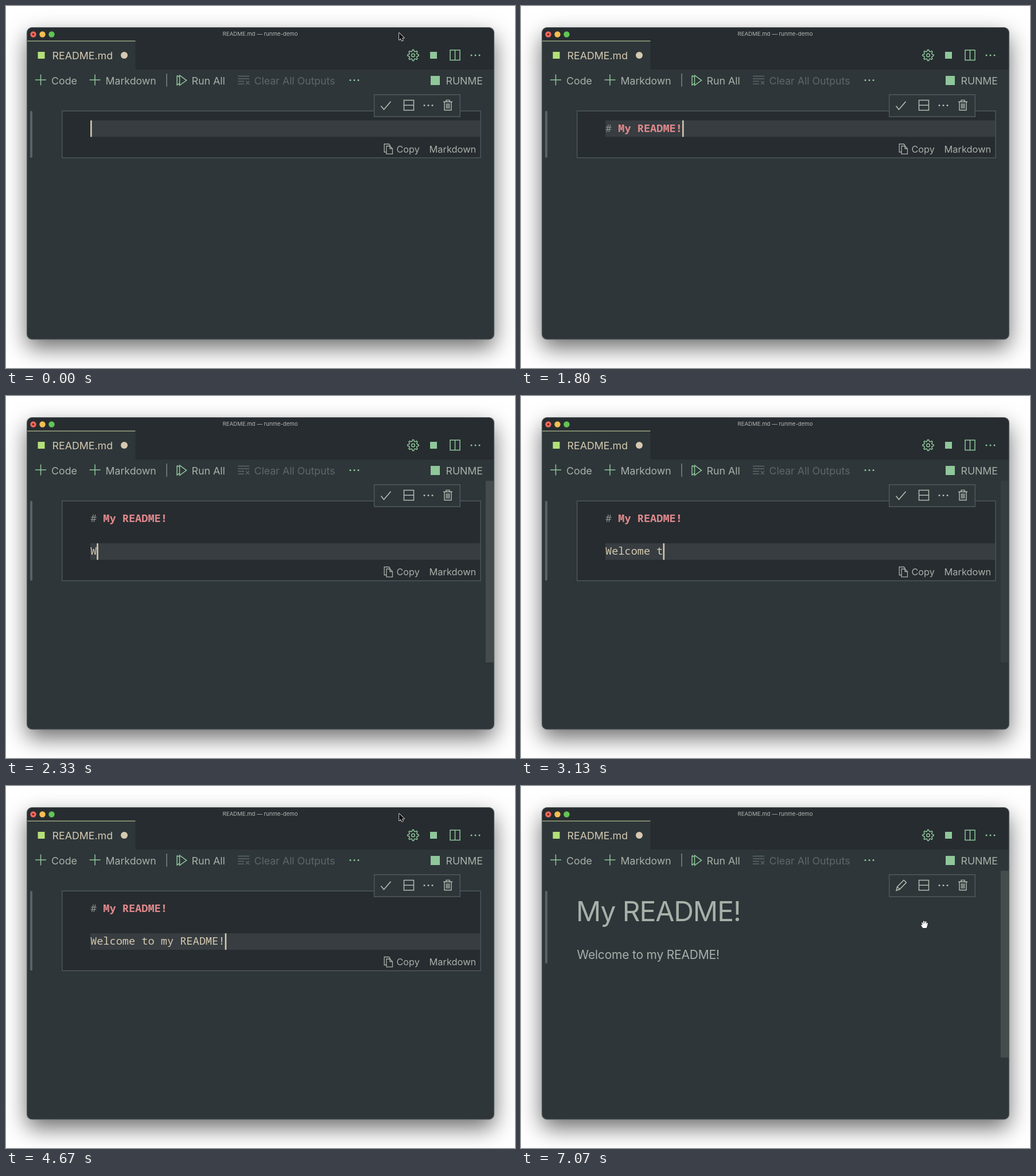
Recreate the animation shown at these times as an HTML page with a canvas. Size 887 by 632 pixels, loop 7.2 s.

```html
<!DOCTYPE html>
<html lang="en">
<head>
<meta charset="utf-8">
<title>README.md — runme-demo</title>
<style>
html, body { margin: 0; width: 100%; height: 100%; overflow: hidden; background: #fff; }
canvas { display: block; width: 887px; height: 632px; }
</style>
</head>
<body>
<canvas id="stage"></canvas>
<script>
const W = 887, H = 632, LOOP = 7200;
const SANS = 'Inter, "Open Sans", sans-serif';
const MONO = '"Noto Sans Mono", "DejaVu Sans Mono", monospace';
const C = {
  body: '#2e3639', dark: '#272c30', line: '#373d41', border: '#4f595d', bar: '#596266',
  text: '#a8b0a9', dim: '#5d6768', cream: '#d5c9b0', mint: '#8fc79a', lime: '#b4e078',
  pink: '#df898c', hash: '#8b928f', icon: '#b4bbb3'
};
const PITCH = 11.17, LINE_H = 28.75, TOP = 199.7, LEFT = 147;
const RENDER = 5600, PENCIL = 5670;

const SCRIPT = '# My README!\n\nWelcome to my README!';
const KEYS = [
  330, 530, 800, 1000, 1070, 1130, 1270, 1330, 1400, 1530, 1600, 1800, 2000, 2130,
  2330, 2530, 2600, 2670, 2800, 2870, 2930, 3070, 3130, 3200,
  3270, 3400, 3470, 3600, 3730, 3800, 3930, 4000, 4130, 4200, 4400
];

const dpr = window.devicePixelRatio || 1;
function prepare(canvas) {
  canvas.width = W * dpr;
  canvas.height = H * dpr;
  const c = canvas.getContext('2d');
  c.scale(dpr, dpr);
  return c;
}
const view = prepare(document.getElementById('stage'));
const base = document.createElement('canvas');
let g = prepare(base);

const clamp = (v, a = 0, b = 1) => Math.min(b, Math.max(a, v));
const ramp = (t, a, b) => clamp((t - a) / (b - a));
const ease = p => p * p * (3 - 2 * p);

function rect(x, y, w, h, color) {
  g.fillStyle = color;
  g.fillRect(x, y, w, h);
}
function round(x, y, w, h, r, fill, stroke, width = 1) {
  g.beginPath();
  g.roundRect(x, y, w, h, r);
  if (fill) { g.fillStyle = fill; g.fill(); }
  if (stroke) { g.strokeStyle = stroke; g.lineWidth = width; g.stroke(); }
}
function disc(x, y, r, color) {
  g.beginPath();
  g.arc(x, y, r, 0, 7);
  g.fillStyle = color;
  g.fill();
}
function stroke(d, color, width = 1.5) {
  g.strokeStyle = color;
  g.lineWidth = width;
  g.stroke(new Path2D(d));
}
function text(s, x, y, size, color, { font = SANS, weight = 400, gap = 0, align = 'left' } = {}) {
  g.font = `${weight} ${size}px ${font}`;
  g.letterSpacing = gap + 'px';
  g.textAlign = align;
  g.fillStyle = color;
  g.fillText(s, x, y);
}
function dots(x, y, color) {
  for (const dx of [-7, 0, 7]) disc(x + dx, y, 1.5, color);
}
function gear(x, y) {
  g.beginPath();
  for (let i = 0; i < 32; i++) {
    const r = i % 4 < 2 ? 9.6 : 7, a = (i - 0.5) * Math.PI / 16;
    g.lineTo(x + r * Math.cos(a), y + r * Math.sin(a));
  }
  g.closePath();
  g.moveTo(x + 2.8, y);
  g.arc(x, y, 2.8, 0, 7);
  g.strokeStyle = C.mint;
  g.lineWidth = 1.5;
  g.stroke();
}

function drawWindow() {
  rect(0, 0, W, H, '#fff');
  g.save();
  g.shadowColor = 'rgba(0,0,0,.58)';
  g.shadowBlur = 38 * dpr;
  g.shadowOffsetY = 15 * dpr;
  round(36.5, 37.5, 814, 544.5, 9, C.body);
  g.restore();

  g.save();
  g.beginPath();
  g.roundRect(36.5, 37.5, 814, 544.5, 9);
  g.clip();
  rect(36, 37, 815, 74, C.dark);
  rect(36, 61, 189.5, 50, C.body);
  rect(36, 60.5, 189.5, 1.3, '#a9b68d');
  g.restore();
  round(36.5, 37.5, 814, 544.5, 9, null, '#5c6366', 1.2);

  disc(47.5, 49.5, 5.2, '#ec6a5e');
  disc(47.5, 49.5, 1.8, '#7f1d14');
  disc(63.5, 49.5, 5.2, '#f4be50');
  disc(79.5, 49.5, 5.2, '#61c455');
  text('README.md — runme-demo', 443, 52, 9.6, '#b3b6b5', { align: 'center' });

  rect(55.5, 80, 12, 12, C.lime);
  text('README.md', 80.5, 92.5, 17.8, C.cream);
  disc(206, 86, 6, C.cream);

  gear(709.5, 86);
  rect(739, 80, 12, 12, C.mint);
  stroke('M774 77h17v17.5h-17zM782.5 77v17.5', C.mint);
  dots(818, 86, C.mint);

  stroke('M51 129h19M60.5 119.5v19M145.5 129h19M155 119.5v19', C.mint);
  text('Code', 79, 136.5, 17.8, C.text);
  text('Markdown', 173.5, 136.5, 17.7, C.text);
  rect(279.3, 118, 1.5, 23, '#7c8683');
  stroke('M298 121.5v16.5l4-2.5M298 121.5l4 2.2M302.5 121v17.5l12-8.7z', C.mint);
  text('Run All', 323.5, 136.5, 17.8, C.text);
  stroke('M404 122.5h20M404 127h20M404 131.5h11M404 136h11M418 131l6 6M424 131l-6 6', C.dim, 1.3);
  text('Clear All Outputs', 432.5, 136.5, 17.7, C.dim);
  dots(607, 129.5, C.mint);
  rect(740, 122, 16, 16, C.mint);
  text('RUNME', 766.5, 136.5, 17.7, C.text);
}

function drawScrollbar(t) {
  let alpha, end;
  if (t >= RENDER) {
    alpha = 1;
    end = 474;
  } else {
    alpha = ramp(t, 1985, 2100) * (1 - ramp(t, 2630, 3430));
    end = t < 2130 ? 484 : 465;
  }
  g.globalAlpha = alpha;
  rect(835.8, 148, 14, end - 148, '#454c4e');
  g.globalAlpha = 1;
}

function drawEditor(t) {
  const count = KEYS.filter(k => k <= t).length;
  const lines = SCRIPT.slice(0, count).split('\n');
  const row = lines.length - 1;
  const bottom = 265 + row * LINE_H;
  const y = TOP + row * LINE_H;

  round(42, 183, 4, bottom - 183, 2, C.bar);
  rect(97.8, 183.3, 729.2, bottom - 183.3, C.dark);
  g.strokeStyle = C.border;
  g.lineWidth = 1.4;
  g.strokeRect(97.8, 183.3, 729.2, bottom - 183.3);
  rect(LEFT, y, 679, LINE_H, C.line);

  const mono = { font: MONO };
  const baseline = n => TOP + n * LINE_H + 20;
  text(lines[0].slice(0, 1), LEFT, baseline(0), 18.6, C.hash, mono);
  text(lines[0].slice(2), LEFT + 2 * PITCH, baseline(0), 18.6, C.pink, { font: MONO, weight: 700 });
  if (row === 2) text(lines[2], LEFT, baseline(2), 18.6, C.cream, mono);
  rect(LEFT + lines[row].length * PITCH, y, 2.6, LINE_H, C.cream);

  g.save();
  g.translate(658, bottom - 25);
  stroke('M5 4.5h6l4.5 4.5v9.3h-10.5zM11 4.5v4.5h4.5M5 15h-3.8v-14h8l2.5 3', C.text, 1.3);
  g.restore();
  text('Copy', 680.5, bottom - 9.5, 16.2, C.text);
  text('Markdown', 737.5, bottom - 9.5, 16.4, C.text);
}

function drawPreview() {
  round(42, 183, 4, 127, 2, C.bar);
  text('My README!', 96, 236, 48, C.text, { gap: -1.1 });
  text('Welcome to my README!', 97.5, 302, 21, C.text, { gap: -0.2 });
}

function drawActions(t, over) {
  round(641.7, 154.7, 149.6, 38.6, 0, C.body, C.border, 1.4);
  if (over) round(646.5, 158, 31, 31, 5, '#3a4148');
  if (t < PENCIL) stroke('M653.5 174.5l5 6.2 12-14', C.icon, 1.7);
  else stroke('M654 182.5l1.6-6.5 11.6-11.7 4.2 4.2-11.4 11.8zM655.6 176l4.4 4.3', C.icon);
  stroke('M693.5 164.5h17v17.5h-17zM693.5 173.2h17', C.icon);
  dots(736, 173.5, C.icon);
  stroke('M762 167.3h16M767 167v-2.6h6v2.6M764 167.5v14.3h12v-14.3M767.5 170v9M770 170v9M772.5 170v9', C.icon, 1.4);
}

const SHAPES = {
  arrow: 'M0 0v12.2l2.8-2.6 1.8 4.2 2.3-1-1.8-4.1h3.9z',
  point: 'M-1.2 1q1.2-2 2.4 0v4.4q1.8-1 2.4.4 1.8-.7 2.3.6 1.9-.3 1.9 1.4v2.4l-1.4 4.2h-6l-3.9-5q-.7-1.9 1-1.5l1.3 1z',
  open: 'M-2.6 6l-3.1-4.2q-.6-1.8 1.1-1.5l1.4 1.2-1.7-4.8q.8-1.6 2 0l1.1 3-.3-5.4q1.1-1.5 2.2 0l.5 5 .9-4.7q1.3-1.2 2 .2l-.4 5 1.2-2.7q1.4-.8 1.6.6l-1 5-1.4 3.3z'
};

function pointerAt(t) {
  if (t < 330) return { x: 685, y: 47 + ramp(t, 0, 140), kind: 'arrow' };
  if (t < 4670) return null;
  if (t < RENDER) {
    const p = ease(ramp(t, 4650, 5345)), q = 1 - p;
    const x = q * q * 685 + 2 * q * p * 705 + p * p * 663;
    const y = q * q * 48 + 2 * q * p * 110 + p * p * 167;
    return { x, y, kind: y > 155 && x < 791 ? 'point' : 'arrow' };
  }
  const p = ease(ramp(t, PENCIL - 40, 6285));
  const x = 663 + 40 * p, y = 167 + 75 * p;
  return { x, y, kind: y < 193 ? 'point' : 'open' };
}

function drawPointer({ x, y, kind }) {
  const shape = new Path2D(SHAPES[kind]), arrow = kind === 'arrow';
  g.save();
  g.translate(x, y);
  g.lineJoin = 'round';
  g.lineWidth = arrow ? 1.6 : 1.2;
  g.strokeStyle = arrow ? '#f4f4f4' : '#15181a';
  g.fillStyle = arrow ? '#0c0e0f' : '#fff';
  g.stroke(shape);
  g.fill(shape);
  g.restore();
}

drawWindow();
g = view;

function frame(now) {
  const t = now % LOOP;
  const pointer = pointerAt(t);
  g.drawImage(base, 0, 0, W, H);
  drawScrollbar(t);
  if (t < RENDER) drawEditor(t);
  else drawPreview();
  const over = pointer && pointer.kind === 'point' && pointer.x < 678;
  drawActions(t, over);
  if (pointer) drawPointer(pointer);
}

const start = performance.now();
function tick() {
  frame(performance.now() - start);
  requestAnimationFrame(tick);
}
tick();
</script>
</body>
</html>
```
